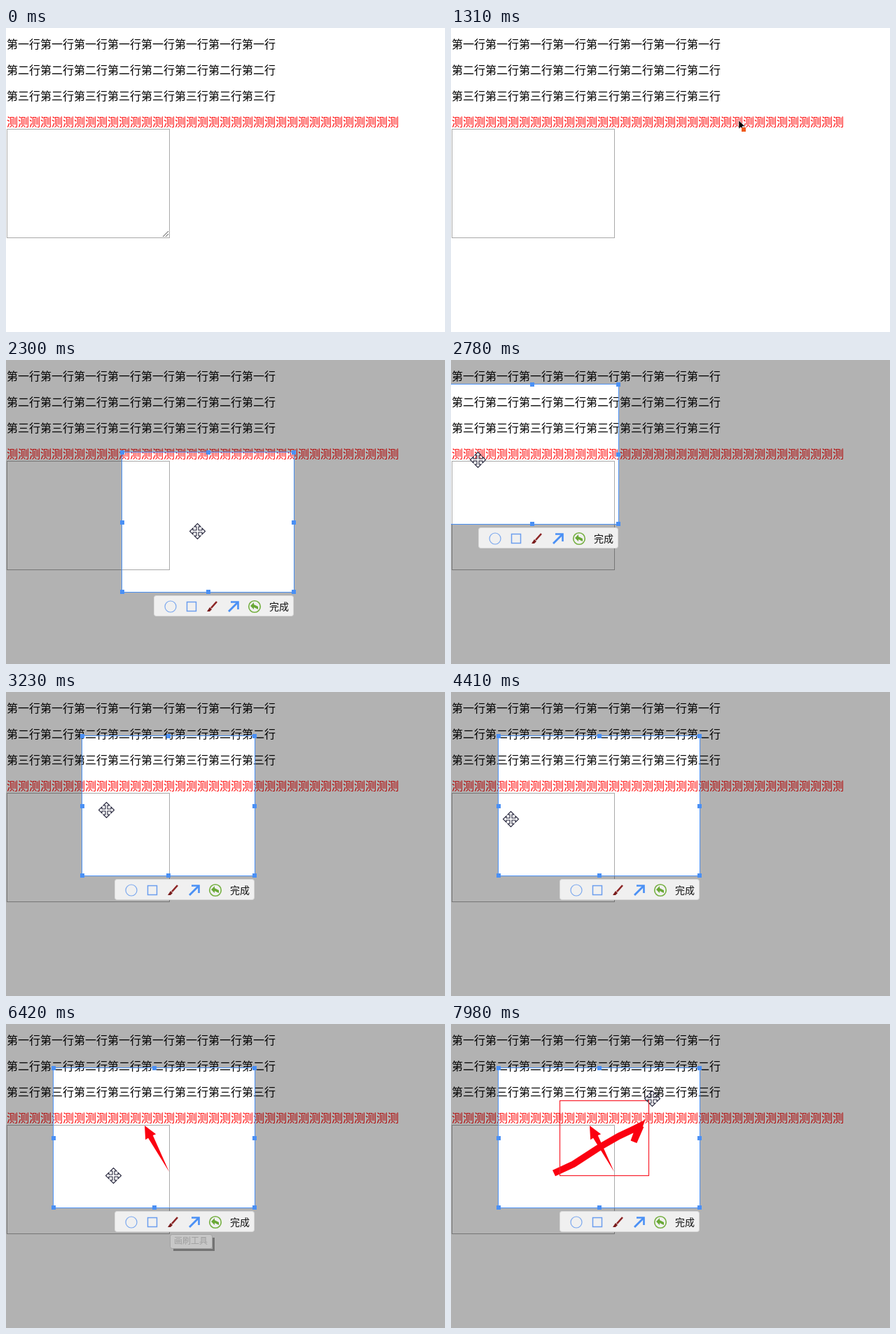
An HTML page with a canvas for the animation above (8 s loop, 627 by 434 pixels).

```html
<!DOCTYPE html>
<html lang="zh-CN">
<head>
<meta charset="utf-8">
<title>截图工具演示</title>
<style>
html, body { margin: 0; width: 100%; height: 100%; overflow: hidden; background: #fff; }
canvas { display: block; }
</style>
</head>
<body>
<canvas id="stage" width="627" height="434"></canvas>
<script>
const ctx = document.getElementById('stage').getContext('2d');
const W = 627, H = 434, LOOP = 8000, TICK = 77;
const FONT = '"Noto Sans CJK SC", "Noto Sans CJK", sans-serif';
const BLUE = '#4a90f5', RED = '#fb0010';

// Pointer moves in order; the pointer rests between them
const step = (start, end, x, y) => ({ start, end, x, y });
const steps = {
  enter: step(150, 460, 371, 227),
  aim: step(920, 1309, 411, 132),
  select: step(1309, 1780, 166, 331),
  center: step(1850, 2310, 273, 244),
  grip: step(2310, 2390, 210, 239),
  moveUp: step(2390, 2772, 38, 142),
  moveBack: step(2772, 3155, 154, 170),
  toHandle: step(3155, 3770, 109, 163),
  stretch: step(4160, 4237, 68, 163),
  inside: step(4312, 4389, 85, 181),
  toArrowTool: step(4389, 4860, 272, 284),
  toTail: step(5030, 5340, 233, 211),
  arrow: step(5340, 5780, 198, 145),
  toBrushTool: step(5860, 6100, 241, 284),
  toStroke: step(6240, 6391, 153, 216),
  brush: step(6560, 6957, 271, 145),
  toRectTool: step(6957, 7260, 209, 284),
  toCorner: step(7430, 7587, 155, 217),
  rect: step(7587, 7880, 283, 109),
  leave: step(7880, 7931, 287, 106)
};

const clamp = (v, lo, hi) => Math.min(hi, Math.max(lo, v));
const progress = (t, { start, end }) => clamp((t - start) / (end - start), 0, 1);
const easeOut = k => k * (2 - k);

function pointerAt(t) {
  let x = 480, y = 415;
  for (const s of Object.values(steps)) {
    const k = easeOut(progress(t, s));
    x += (s.x - x) * k;
    y += (s.y - y) * k;
  }
  y -= 5 * Math.sin(Math.PI * easeOut(progress(t, steps.brush)));   // bowed stroke
  return [Math.round(x), Math.round(y)];
}

function selectionAt(t) {
  const { select, moveUp, moveBack, toHandle, stretch } = steps;
  if (t < moveUp.start) {
    const [x, y] = pointerAt(Math.min(t, select.end));
    return { x, y: 132, w: 411 - x, h: y - 132 };
  }
  if (t < toHandle.end) {
    const [x, y] = pointerAt(Math.min(t, moveBack.end));
    return { x: x - 45, y: y - 107, w: 246, h: 199 };
  }
  const [x] = pointerAt(Math.min(t, stretch.end));
  return { x, y: 63, w: 355 - x, h: 199 };
}

function shape(points, fill, stroke, width = 1, close = true) {
  ctx.beginPath();
  points.forEach(([x, y]) => ctx.lineTo(x, y));
  if (close) ctx.closePath();
  if (fill) { ctx.fillStyle = fill; ctx.fill(); }
  if (stroke) { ctx.strokeStyle = stroke; ctx.lineWidth = width; ctx.stroke(); }
}

const line = (points, color, width) => shape(points, null, color, width, false);

function box(x, y, w, h, color, width = 1) {
  ctx.strokeStyle = color;
  ctx.lineWidth = width;
  ctx.strokeRect(x, y, w, h);
}

function panel(x, y, w, h, fill, stroke) {
  ctx.fillStyle = fill;
  ctx.strokeStyle = stroke;
  ctx.lineWidth = 1;
  ctx.beginPath();
  ctx.roundRect(x + .5, y + .5, w - 1, h - 1, 3);
  ctx.fill();
  ctx.stroke();
}

function ring(x, y, r, color, width) {
  ctx.beginPath();
  ctx.arc(x, y, r, 0, 7);
  ctx.strokeStyle = color;
  ctx.lineWidth = width;
  ctx.stroke();
}

function text(str, x, y, size, color) {
  ctx.font = `350 ${size}px ${FONT}`;
  ctx.fillStyle = color;
  ctx.fillText(str, x, y);
}

function at(x, y, draw) {
  ctx.save();
  ctx.translate(x, y);
  draw();
  ctx.restore();
}

function drawPage(live) {
  ctx.fillStyle = '#fff';
  ctx.fillRect(0, 0, W, H);
  ['一', '二', '三'].forEach((n, i) => text(`第${n}行`.repeat(8), 1, 29 + 37 * i, 16, '#000'));
  text('测'.repeat(35), 1, 140, 16, '#f00');
  box(1.5, 144.5, 232, 155, '#a9a9a9');
  if (live) for (const size of [8, 4]) line([[232 - size, 298], [232, 298 - size]], '#555', 1);
}

function drawSelection({ x, y, w, h }) {
  ctx.beginPath();
  ctx.rect(0, 0, W, H);
  ctx.rect(x, y, w, h);
  ctx.fillStyle = 'rgba(0,0,0,.3)';
  ctx.fill('evenodd');
  box(x - .5, y - .5, w + 1, h + 1, BLUE);
  ctx.fillStyle = BLUE;
  for (const i of [0, .5, 1]) for (const j of [0, .5, 1]) {
    if (i !== .5 || j !== .5) ctx.fillRect(Math.round(x + w * i) - 3, Math.round(y + h * j) - 3, 6, 6);
  }
}

function drawToolbar({ x, y, w, h }) {
  at(x + w - 200, y + h + 5, () => {
    panel(0, 0, 200, 30, '#f0f0f0', '#d8d8d8');
    ring(24, 16, 8, '#7aa7ee', 1.2);
    box(47.5, 9.5, 13, 13, '#6c9eee', 1.5);
    line([[90, 9], [82, 18]], '#8c2424', 2.6);
    shape([[80, 17], [83, 20], [80, 23], [76, 23]], '#7a1d1d');
    line([[107, 23], [120, 10]], BLUE, 2.8);
    line([[110, 9.5], [120.5, 9.5], [120.5, 20]], BLUE, 2.6);
    ring(144, 16, 8.3, '#76b043', 1.6);
    shape([[138, 15], [143, 10], [143, 13], [149, 16], [149, 20], [143, 17], [143, 20]], '#69a836');
    text('完成', 165, 21, 14, '#111');
  });
}

function drawTooltip(alpha) {
  ctx.save();
  ctx.globalAlpha = alpha;
  ctx.fillStyle = '#000';
  ctx.fillRect(295, 305, 3, 19);
  ctx.fillRect(239, 321, 56, 3);
  panel(234, 300, 61, 21, '#ececec', '#767676');
  text('画刷工具', 240, 314, 12, '#575757');
  ctx.restore();
}

function drawArrow({ x: x0, y: y0 }, [x1, y1]) {
  const length = Math.hypot(x1 - x0, y1 - y0);
  const size = Math.min(1, length / 25);
  const half = side => [[-18.5 * size, side * 8.5 * size], [-18 * size, side * 3.8 * size]];
  at(x1, y1, () => {
    ctx.rotate(Math.atan2(y1 - y0, x1 - x0));
    shape([[0, 0], ...half(1), [-length, 0], ...half(-1).reverse()], RED);
  });
}

function drawInk(t) {
  const { toTail, arrow, brush, rect } = steps;
  if (t > arrow.start) drawArrow(toTail, pointerAt(Math.min(t, arrow.end)));
  if (t > brush.start) {
    const points = [[147, 213]];
    for (let s = brush.start; s < Math.min(t, brush.end); s += TICK) points.push(pointerAt(s + TICK / 2));
    line([...points, pointerAt(Math.min(t, brush.end))], RED, 9.5);
  }
  if (t > rect.start) {
    const [x, y] = pointerAt(Math.min(t, rect.end));
    box(155.5, y + .5, x - 156, 216 - y, '#f8202c', 1.2);
  }
}

// Outlined double arrows, one arm for each angle
function drawArms(angles) {
  const arm = [[-1.5, -1.5], [-1.5, -6.5], [-4.5, -6.5], [0, -11], [4.5, -6.5], [1.5, -6.5], [1.5, -1.5]];
  const points = angles.flatMap(a => arm.map(([x, y]) =>
    [x * Math.cos(a) - y * Math.sin(a), x * Math.sin(a) + y * Math.cos(a)]));
  shape(points, '#fff', '#23233a', 1.1);
}

function drawPointer(t, sel) {
  const { aim, center, toHandle, inside } = steps;
  const [x, y] = pointerAt(t);
  at(x, y, () => {
    if (t >= toHandle.end && t < inside.start) {
      drawArms([Math.PI / 2, Math.PI * 1.5]);
    } else if (t >= center.start && y <= sel.y + sel.h) {
      ctx.translate(.5, .5);
      drawArms([0, 1, 2, 3].map(i => i * Math.PI / 2));
    } else {
      shape([[0, 0], [0, 12], [3, 9.5], [5, 14], [7, 13], [5, 8.5], [9, 8.5]], '#000', '#fff', .6);
      ctx.fillStyle = '#f05a1a';
      if (t >= aim.start && t < center.start) ctx.fillRect(4, 10, 6, 6);
    }
  });
}

function render(time) {
  const t = Math.floor((time + 20) / TICK) * TICK;
  const { enter, aim, select, center, toBrushTool } = steps;
  const sel = selectionAt(t);
  drawPage(t < aim.start);
  if (t > select.start) drawSelection(sel);
  drawInk(t);
  if (t >= center.start) drawToolbar(sel);
  if (t > toBrushTool.end) drawTooltip(clamp((6480 - t) / 250, 0, 1));
  if (t >= enter.start) drawPointer(t, sel);
}

const begin = performance.now();
function tick() {
  render((performance.now() - begin) % LOOP);
  requestAnimationFrame(tick);
}
tick();
</script>
</body>
</html>
```
